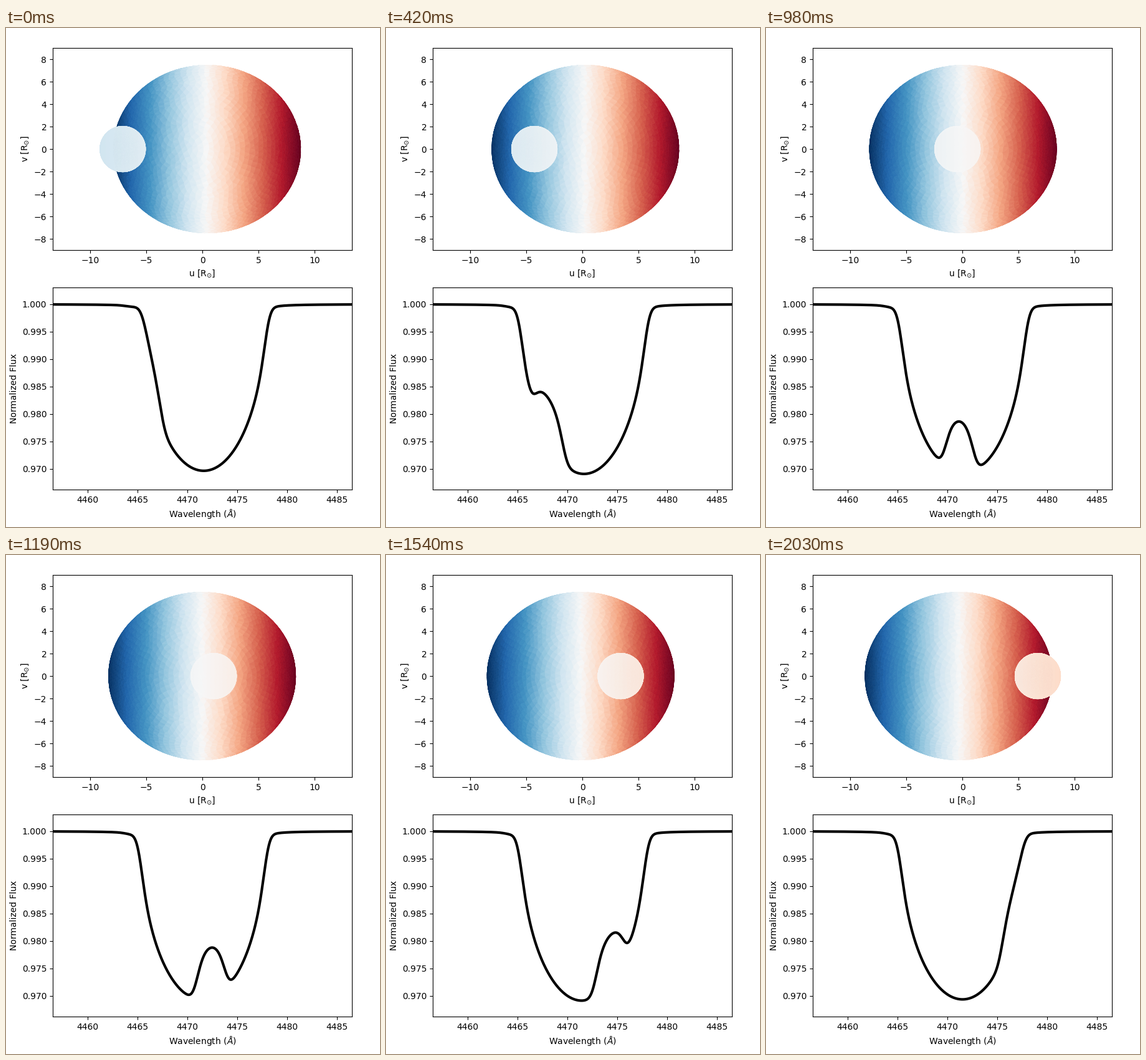
A matplotlib script that plays this animation: 600 by 800 pixels, repeating every 2.1 s.

```python
import numpy as np
import matplotlib.pyplot as plt
from matplotlib.animation import FuncAnimation
from matplotlib.collections import PolyCollection
from matplotlib.tri import Triangulation

FRAMES, INTERVAL = 30, 70

# Orbit and stars, lengths in solar radii
SEPARATION, STEP, MID = 26.0, 0.01855, 14.91
MASS_RATIO = 0.055
A1, B1, R2 = 8.345, 7.48, 2.04
SPIN, ORBIT = 0.119, 0.0217  # velocity per unit of u

# Spectral line, in angstroms
LINE, WIDTH, DEPTH = 4471.57, 6.36, 0.0292
SIGMA, GAMMA, WING = 0.40, 0.4, 0.22


def sphere_mesh(d=0.066, reach=1.95):
    """Triangles on a unit sphere, grown in rings from the point facing us."""
    rng = np.random.default_rng(4)
    theta, phi = [np.zeros(1)], [np.zeros(1)]
    for t in np.arange(d, reach, 0.866 * d):
        n = int(round(2 * np.pi * np.sin(t) / d))
        theta.append(t + rng.normal(0, 0.06 * d, n))
        phi.append((np.arange(n) + rng.random()) * 2 * np.pi / n)
    theta, phi = np.concatenate(theta), np.concatenate(phi)
    tri = Triangulation(theta * np.cos(phi), theta * np.sin(phi)).triangles
    points = np.column_stack((np.sin(theta) * np.cos(phi),
                              np.sin(theta) * np.sin(phi),
                              np.cos(theta)))
    return points, tri


POINTS, TRI = sphere_mesh()


def visible_faces(angle):
    """Projected front faces after a turn about the vertical axis."""
    x, y, z = POINTS.T
    faces = np.column_stack((x * np.cos(angle) + z * np.sin(angle), y))[TRI]
    p, q = faces[:, 1] - faces[:, 0], faces[:, 2] - faces[:, 0]
    return faces[p[:, 0] * q[:, 1] - p[:, 1] * q[:, 0] > 0]


def positions(i):
    angle = STEP * (i - MID)
    u2 = SEPARATION * np.sin(angle)
    return angle, 0.03 - MASS_RATIO * u2, u2


def half_chord(x):
    return np.sqrt(np.clip(1 - x ** 2, 0, None))


wave = np.linspace(4456.5, 4486.5, 700)
strip = np.linspace(-1, 1, 481)
shift = wave[:, None] - LINE - WIDTH * strip
gauss = np.exp(-0.5 * (shift / SIGMA) ** 2) / (SIGMA * np.sqrt(2 * np.pi))
lorentz = GAMMA / np.pi / (shift ** 2 + GAMMA ** 2)
kernel = ((1 - WING) * gauss + WING * lorentz) * WIDTH * (strip[1] - strip[0])
forbidden = 0.00015 * np.exp(-0.5 * ((wave - 4464.3) / 0.6) ** 2)


def spectrum(u1, u2):
    """Rotationally broadened line, less the strips hidden by the companion."""
    disk = half_chord(strip)
    hidden = R2 / B1 * half_chord((u1 + A1 * strip - u2) / R2)
    covered = np.minimum(hidden, disk).sum() * (strip[1] - strip[0])
    covered /= np.pi / 2 * R2 ** 2 / (A1 * B1)
    limb = 0.96 + 0.25 * (1 - strip ** 2) ** 2
    hidden = np.minimum(hidden * limb, disk)
    depth = DEPTH * (1 + 0.077 * covered) * (kernel @ (disk - hidden))
    drift = WIDTH / A1 * ORBIT / SPIN * u1
    return 1 - np.interp(wave - drift, wave, depth) - forbidden


fig = plt.figure(figsize=(6, 8), dpi=100)
sky = fig.add_axes([0.1251, 0.5549, 0.8, 0.405])
sky.set(xlim=(-40 / 3, 40 / 3), ylim=(-9, 9),
        xlabel=r"u [$\mathrm{R_{\odot}}$]", ylabel=r"v [$\mathrm{R_{\odot}}$]")
spec = fig.add_axes([0.1251, 0.075, 0.8, 0.405])
spec.set(xlim=(4456.5, 4486.5), ylim=(0.96623, 1.00305),
         xlabel=r"Wavelength ($\AA$)", ylabel="Normalized Flux")


def add_star(zorder):
    star = PolyCollection([], cmap="RdBu_r", edgecolors="face",
                          linewidths=0.5, zorder=zorder)
    star.set_clim(-1, 1)
    return sky.add_collection(star, autolim=False)


primary, secondary = add_star(1), add_star(2)
profile, = spec.plot(wave, np.ones_like(wave), color="black", lw=3)


def place(star, faces, u, a, b, spin):
    star.set_verts(faces * (a, b) + (u, 0))
    star.set_array(ORBIT * u + spin * a * faces[:, :, 0].mean(axis=1))


def update(i):
    angle, u1, u2 = positions(i)
    faces = visible_faces(angle)
    place(primary, faces, u1, A1, B1, SPIN)
    place(secondary, faces, u2, R2, R2, ORBIT)
    profile.set_ydata(spectrum(u1, u2))
    return primary, secondary, profile


anim = FuncAnimation(fig, update, frames=FRAMES, interval=INTERVAL,
                     repeat=True, repeat_delay=0, blit=False)
plt.show()
```
